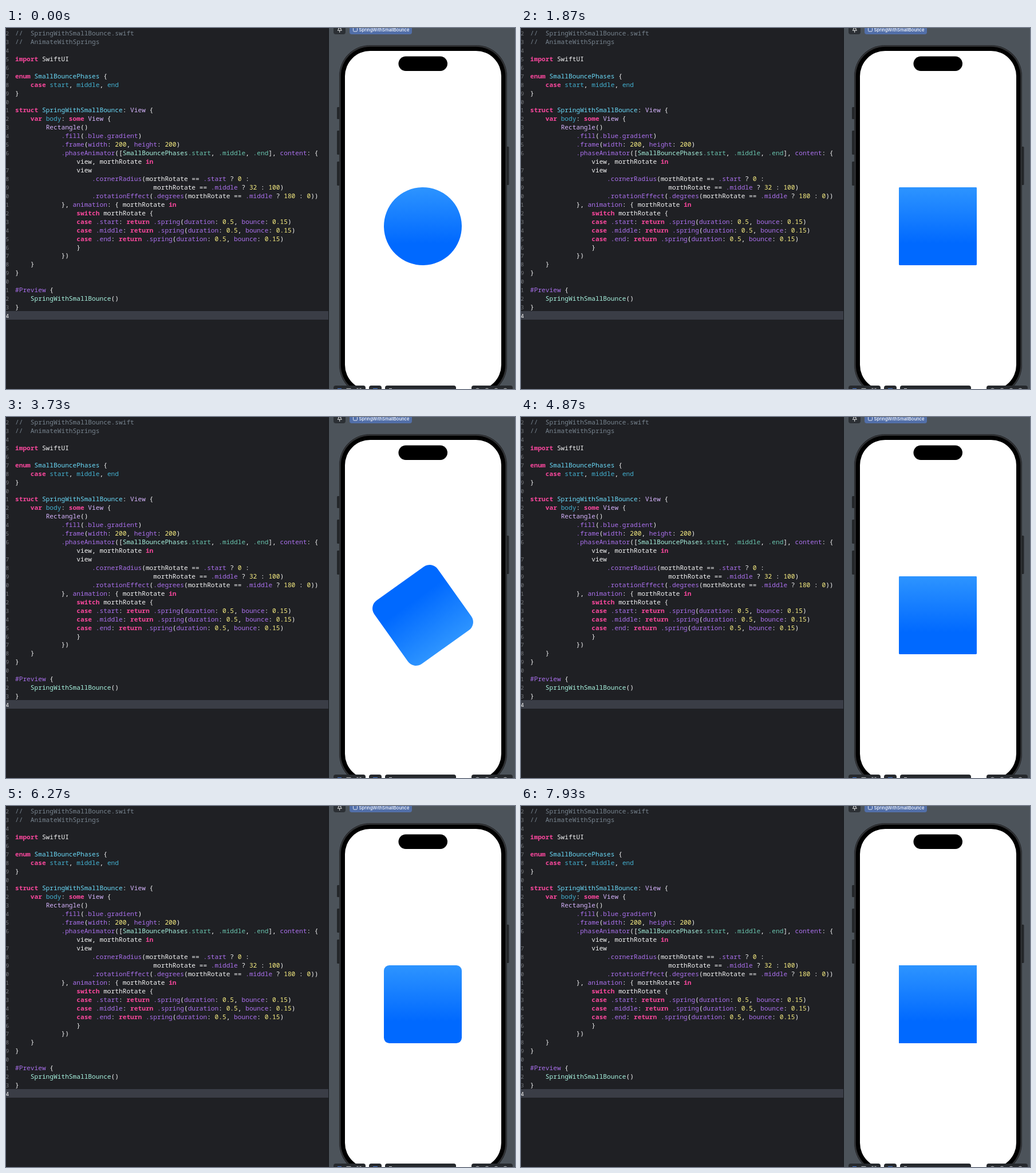
Recreate the animation shown at these times as an HTML page. Size 889 by 630 pixels, loop 8000 ms.

```html
<!DOCTYPE html>
<html lang="en">
<head>
<meta charset="utf-8">
<title>Spring with small bounce</title>
<style>
html, body { margin: 0; width: 100%; height: 100%; overflow: hidden; background: #1f2024; }
svg { display: block; width: 100%; height: 100%; }
#code text { font: 500 11.18px "Noto Sans Mono", "DejaVu Sans Mono", monospace; white-space: pre; fill: #f4f4f5; }
#code .num { font-size: 9.4px; fill: #74777d; }
#code .now { fill: #fff; }
.c { fill: #77838e; }
.k { fill: #f8479c; font-weight: 700; }
.t { fill: #6bdcfb; }
.d { fill: #43b0d0; }
.o { fill: #d6b4fd; }
.p { fill: #a8f4e0; }
.e { fill: #6ac4ae; }
.m { fill: #ab70ee; }
.n { fill: #fbf083; }
.tab { font: 500 7.6px Inter, "Open Sans", sans-serif; fill: #fff; text-anchor: middle; }
</style>
</head>
<body>
<svg viewBox="0 0 889 630" preserveAspectRatio="none">
  <defs>
    <linearGradient id="blue" x1="0" y1="0" x2="0" y2="1">
      <stop offset="0" stop-color="#2d94ff"/>
      <stop offset=".72" stop-color="#0069ff"/>
      <stop offset="1" stop-color="#0069ff"/>
    </linearGradient>
  </defs>

  <rect width="889" height="630" fill="#1f2024"/>
  <rect y="494" width="563" height="15" fill="#3a3d46"/>
  <g id="code"></g>

  <rect x="563" width="326" height="630" fill="#4c535a"/>
  <rect x="563" width="1" height="630" fill="#15161a"/>

  <g fill="#2c3035">
    <rect x="572" y="-8" width="21" height="19" rx="4"/>
    <rect x="600" y="-8" width="109" height="19" rx="4" fill="#526fa9"/>
  </g>
  <path d="M580.5 0h4.5l-.4 2 1.8 2.2h-7.2l1.8-2.2zM582.7 4v4" fill="none" stroke="#e8e9ea" stroke-width="1"/>
  <rect x="606.5" y="-1" width="7" height="7" rx="1.5" fill="none" stroke="#e5eaf5"/>
  <text class="tab" x="660.5" y="5.8">SpringWithSmallBounce</text>

  <g fill="#24272a">
    <rect x="578" y="138" width="5" height="21" rx="1.5"/>
    <rect x="578" y="179" width="5" height="42" rx="1.5"/>
    <rect x="578" y="233" width="5" height="42" rx="1.5"/>
    <rect x="874" y="207" width="4.5" height="67" rx="1.5"/>
  </g>
  <rect x="582" y="30" width="293" height="612" rx="54" fill="#1d1e20"/>
  <rect x="583.3" y="31.3" width="290.4" height="609.4" rx="52.7" fill="none" stroke="#424447" stroke-width="1"/>
  <rect x="585" y="33" width="287" height="606" rx="51" fill="#000"/>
  <rect x="592" y="40" width="273" height="592" rx="44" fill="#fff"/>
  <rect x="685.5" y="49.5" width="85.5" height="25.5" rx="12.75" fill="#000"/>

  <rect id="box" x="660" y="278" width="136" height="136" fill="url(#blue)"/>

  <g fill="#26292d">
    <rect x="572" y="624" width="56" height="20" rx="4"/>
    <rect x="634" y="624" width="22" height="20" rx="4"/>
    <rect x="662" y="624" width="124" height="20" rx="4"/>
    <rect x="813" y="624" width="72" height="20" rx="4"/>
  </g>
  <g fill="none" stroke="#c9cccf">
    <path d="M594.5 629.3h8M612.5 629.3h3M617.5 629.3h3M669 629.5h5"/>
    <path d="M579 629.4h7M641 629.4h8" stroke="#4d7fd6"/>
    <path d="M820 630.5q3.500-3 7 0M836.500 630.5q3.500-3 7 0M852.500 630.5q3.500-3 7 0M868.500 630.5q3.500-3 7 0"/>
  </g>
</svg>
<script>
// Spans are marked as class‹text›
const SOURCE = `c‹//  SpringWithSmallBounce.swift›
c‹//  AnimateWithSprings›

k‹import› SwiftUI

k‹enum› t‹SmallBouncePhases› {
    k‹case› d‹start›, d‹middle›, d‹end›
}

k‹struct› t‹SpringWithSmallBounce›: o‹View› {
    k‹var› d‹body›: k‹some› o‹View› {
        o‹Rectangle›()
            m‹.fill›(m‹.blue.gradient›)
            m‹.frame›(m‹width›: n‹200›, m‹height›: n‹200›)
            m‹.phaseAnimator›([p‹SmallBouncePhases›e‹.start›, e‹.middle›, e‹.end›], m‹content›: {
                view, morthRotate k‹in›
                view
                    m‹.cornerRadius›(morthRotate == m‹.start› ? n‹0› :
                                    morthRotate == m‹.middle› ? n‹32› : n‹100›)
                    m‹.rotationEffect›(m‹.degrees›(morthRotate == m‹.middle› ? n‹180› : n‹0›))
            }, m‹animation›: { morthRotate k‹in›
                k‹switch› morthRotate {
                k‹case› m‹.start›: k‹return› m‹.spring›(m‹duration›: n‹0.5›, m‹bounce›: n‹0.15›)
                k‹case› m‹.middle›: k‹return› m‹.spring›(m‹duration›: n‹0.5›, m‹bounce›: n‹0.15›)
                k‹case› m‹.end›: k‹return› m‹.spring›(m‹duration›: n‹0.5›, m‹bounce›: n‹0.15›)
                }
            })
    }
}

m‹#Preview› {
    p‹SpringWithSmallBounce›()
}
`;
const LINE = 14.94, WRAPPED = 15;

document.getElementById('code').innerHTML = SOURCE.split('\n').map((line, row, all) => {
  const y = (13 + row * LINE).toFixed(2);
  const last = row === all.length - 1 ? ' now' : '';
  const number = row === WRAPPED ? '' : (row + (row < WRAPPED ? 2 : 1)) % 10;
  const spans = line.replace(/([a-z])‹(.*?)›/g, '<tspan class="$1">$2</tspan>');
  return `<text class="num${last}" x="-0.5" y="${y}">${number}</text><text x="16" y="${y}">${spans}</text>`;
}).join('');

const LOOP = 8000, STEP = 1000 / 15, CYCLE = 1500;
const SCALE = 0.68, CX = 728, CY = 346;
const START = { radius: 0, angle: 0 };
const MIDDLE = { radius: 32, angle: 180 };
const END = { radius: 100, angle: 0 };
const PHASES = [
  { at: 35, from: END, to: START },
  { at: 527, from: START, to: MIDDLE },
  { at: 1035, from: MIDDLE, to: END }
];
const box = document.getElementById('box');

// Underdamped spring: duration 0.5 s, bounce 0.15
function spring(ms) {
  const omega = 2 * Math.PI / 0.5, zeta = 1 - 0.15, t = ms / 1000;
  const damped = omega * Math.sqrt(1 - zeta * zeta), decay = zeta * omega;
  return 1 - Math.exp(-decay * t) * (Math.cos(damped * t) + decay / damped * Math.sin(damped * t));
}

function render(time) {
  const t = Math.floor((time % LOOP + 4) / STEP) % 120 * STEP;
  const local = (t - PHASES[0].at + CYCLE) % CYCLE + PHASES[0].at;
  const phase = PHASES.filter(p => p.at <= local).pop();
  const x = spring(local - phase.at);
  const mix = key => phase.from[key] + (phase.to[key] - phase.from[key]) * x;
  const radius = Math.min(100, Math.max(0, mix('radius'))) * SCALE;
  box.setAttribute('rx', radius.toFixed(3));
  box.setAttribute('transform', `rotate(${mix('angle').toFixed(3)} ${CX} ${CY})`);
}

const began = performance.now();
function tick() {
  render(performance.now() - began);
  requestAnimationFrame(tick);
}
tick();
</script>
</body>
</html>
```
